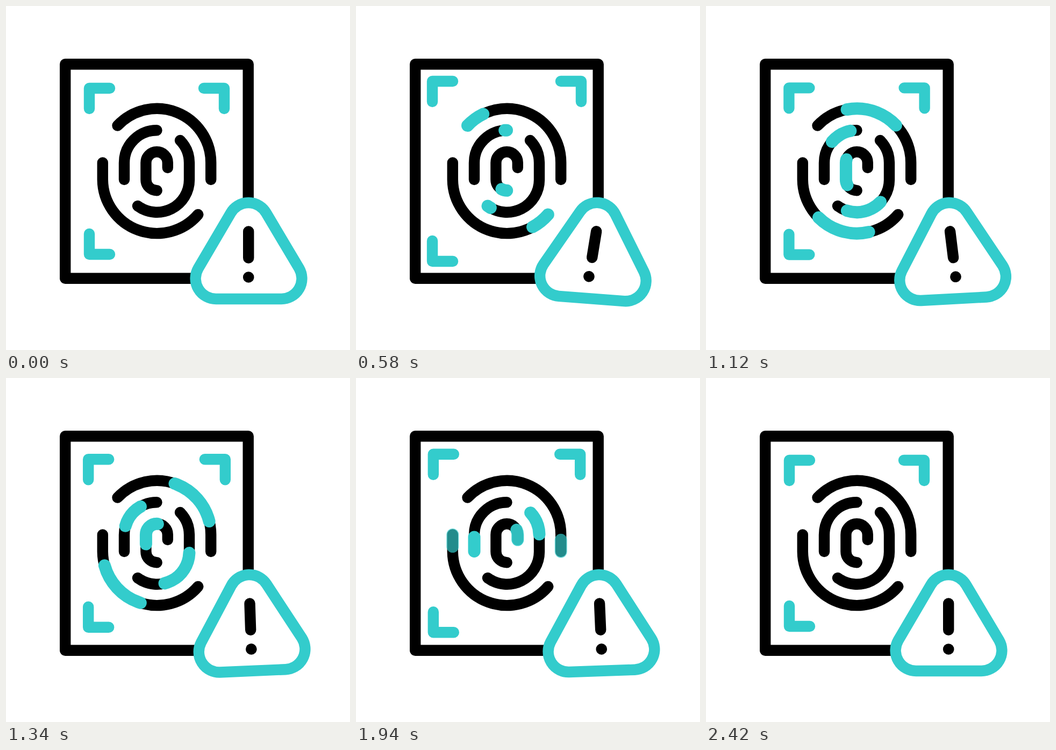
Write an HTML page that moves like this. It is 640 px wide and 640 px high and loops after 2.62 s.

```html
<!DOCTYPE html>
<html lang="en">
<head>
<meta charset="utf-8">
<title>Fingerprint scan warning</title>
<style>
  html, body { margin: 0; width: 100%; height: 100%; overflow: hidden; background: #fff; }
  svg { display: block; width: 100%; height: 100%; }
  path, line { fill: none; stroke: #000; stroke-width: 20.4; stroke-linecap: round; stroke-linejoin: round; }
  .teal { stroke: #3cc; }
  .glow { stroke: #3cc; stroke-width: 23; visibility: hidden; }
  .sign { fill: #fff; }
</style>
</head>
<body>
<svg viewBox="0 0 640 640">
  <path d="M110.2 108.2H450.7V506.8H110.2Z"/>
  <path class="teal corner" d="M155 191V153H193"/>
  <path class="teal corner" d="M368 153H406V191"/>
  <path class="teal corner" d="M155 424V462H193"/>
  <g id="ridges"></g>
  <g id="triangle">
    <path class="teal sign" d="M390.5 545H512.5A38 38 0 0 0 545.3 488L484 385A38 38 0 0 0 418.2 385L357.7 488A38 38 0 0 0 390.5 545Z"/>
    <g id="mark">
      <line x1="451.2" y1="419.4" x2="451.2" y2="468.8"/>
      <circle cx="451.2" cy="504.5" r="10.3"/>
    </g>
  </g>
</svg>
<script>
const LOOP = 2620;
const SWEEP = 1600;
const HEAD = 213, TAIL = 620;

// path and delay of its sweep
const RIDGES = [
  ['M207.5 222.5A100.5 100.5 0 0 1 381.2 291.5V323', 0],
  ['M357.3 388A101 101 0 0 1 179.8 323V291.5', 0],
  ['M280.5 231.2A60.5 60.5 0 0 0 220 291.7V323', 200],
  ['M245 372A60.3 60.3 0 0 0 341 323V291.5A60.3 60.3 0 0 0 324 250', 200],
  ['M280.7 343.3A20.3 20.3 0 0 1 260.4 323V291.5A20.2 20.2 0 0 1 300.8 291.5V301', 100]
];

// time, degrees
const SWING = [[0, 0], [600, 5], [1100, -4], [1500, 3], [1820, -2], [2060, 1], [2300, 0]];

const $ = id => document.getElementById(id);
const clamp = x => Math.min(1, Math.max(0, x));
const ease = x => { x = clamp(x); return x * x * (3 - 2 * x); };

function swing(t) {
  for (let i = 1; i < SWING.length; i++) {
    const [t0, a] = SWING[i - 1], [t1, b] = SWING[i];
    if (t < t1) return a + (b - a) * ease((t - t0) / (t1 - t0));
  }
  return 0;
}

function addPath(d, cls) {
  const p = document.createElementNS('http://www.w3.org/2000/svg', 'path');
  p.setAttribute('d', d);
  p.setAttribute('class', cls);
  $('ridges').append(p);
  return p;
}

RIDGES.forEach(([d]) => addPath(d, 'ridge'));
const glows = RIDGES.map(([d, delay]) => {
  const el = addPath(d, 'glow');
  return { el, delay, len: el.getTotalLength() };
});
const corners = [...document.querySelectorAll('.corner')];
const OUTWARD = [[-1, -1], [1, -1], [-1, 1]];

function draw(t) {
  const phase = t < 2400 ? t % 1200 / 600 : 0;
  const push = 13 * ease(phase < 1 ? phase : 2 - phase);
  corners.forEach((el, i) => {
    const [x, y] = OUTWARD[i];
    el.setAttribute('transform', `translate(${x * push} ${y * push})`);
  });

  for (const { el, delay, len } of glows) {
    const u = t - delay;
    const head = ease((u - HEAD) / SWEEP), tail = ease((u - TAIL) / SWEEP);
    el.style.visibility = head > tail ? 'visible' : 'hidden';
    el.style.strokeDasharray = `${(head - tail) * len} ${2 * len}`;
    el.style.strokeDashoffset = -tail * len;
    el.style.opacity = 1 - clamp((u - HEAD - SWEEP) / (TAIL - HEAD));
  }

  $('triangle').setAttribute('transform', `rotate(${swing(Math.max(0, t - 120))} 451.2 366)`);
  $('mark').setAttribute('transform', `rotate(${swing(t)} 451.2 419.4)`);
}

const began = performance.now();
function tick() {
  draw((performance.now() - began) % LOOP);
  requestAnimationFrame(tick);
}
tick();
</script>
</body>
</html>
```
